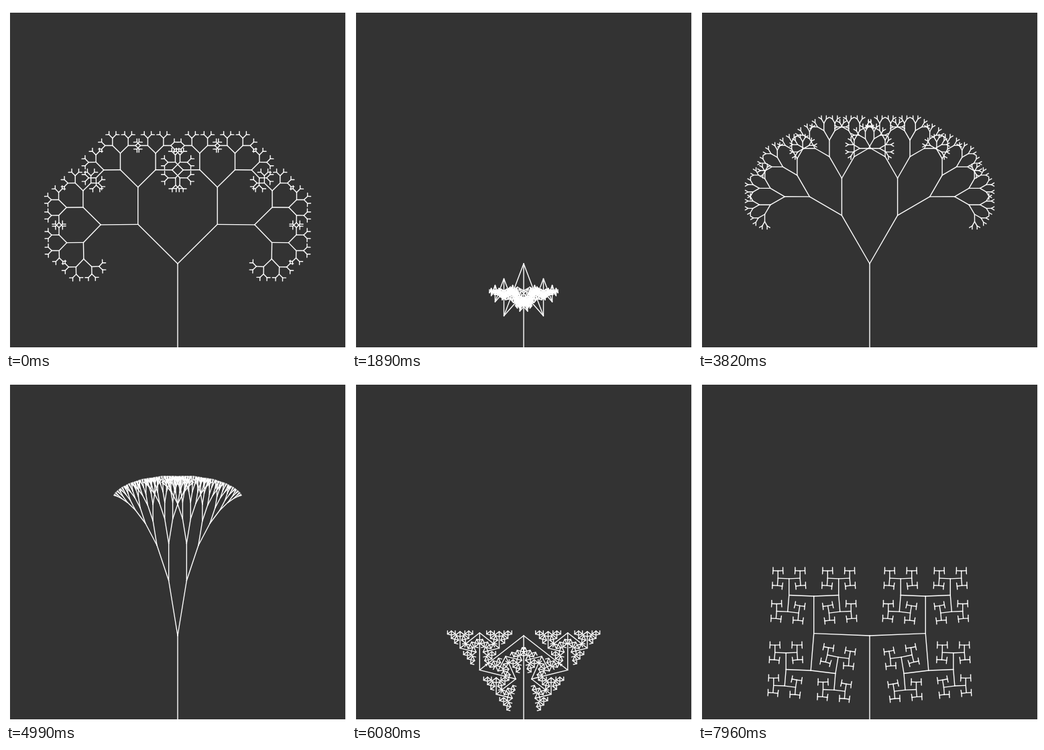
An HTML page with a canvas that plays this animation: 507 px wide and 514 px high, repeating every 8 s.

```html
<!DOCTYPE html>
<html lang="en">
<head>
<meta charset="utf-8">
<title>Fractal tree</title>
<style>
  html, body { margin: 0; width: 100%; height: 100%; overflow: hidden; background: #fff; }
  canvas { display: block; width: 507px; height: 514px; }
</style>
</head>
<body>
<canvas id="stage" width="507" height="514"></canvas>
<script>
const ctx = document.getElementById('stage').getContext('2d');
const LOOP = 8000;
const TICK = 76;
const RATIO = 2 / 3;
const REST = 0.79;

// Drags of the angle; ease above 1 slows towards the end
const drags = [
  { at: 1200, steps: 10, to: 2.78, ease: 2 },
  { at: 2200, steps: 5, to: 2.43 },
  { at: 2750, steps: 4, to: 1.72, ease: 0.85 },
  { at: 3130, steps: 3, to: 1.19 },
  { at: 3440, steps: 8, to: 0.3 },
  { at: 4140, steps: 2, to: 0.21 },
  { at: 4390, steps: 3, to: 0 },
  { at: 4990, steps: 11, to: 1.63, ease: 1.09 },
  { at: 5830, steps: 11, to: 2.99, ease: 1.3 },
  { at: 6780, steps: 1, to: 3 },
  { at: 7100, steps: 11, to: 1.67 },
  { at: 7960, steps: 1, to: 1.53 }
];

function angleAt(t) {
  let angle = REST;
  for (const { at, steps, to, ease = 1 } of drags) {
    if (t < at) break;
    const step = Math.min(Math.floor((t - at) / TICK) + 1, steps);
    angle += (to - angle) * (1 - (1 - step / steps) ** ease);
  }
  return angle;
}

function branch(x, y, len, heading, spread) {
  const tx = x + len * Math.sin(heading);
  const ty = y - len * Math.cos(heading);
  ctx.beginPath();
  ctx.moveTo(x, y);
  ctx.lineTo(tx, ty);
  ctx.stroke();
  const next = len * RATIO;
  if (next > 4) {
    branch(tx, ty, next, heading + spread, spread);
    branch(tx, ty, next, heading - spread, spread);
  }
}

function draw(angle) {
  ctx.fillStyle = '#fff';
  ctx.fillRect(0, 0, 507, 514);
  ctx.save();
  ctx.beginPath();
  ctx.rect(6, 10, 500, 500);
  ctx.clip();
  ctx.fillStyle = '#333';
  ctx.fillRect(6, 10, 500, 500);
  ctx.strokeStyle = '#fff';
  ctx.lineWidth = 1.4;
  ctx.lineCap = 'round';
  branch(256, 510, 125, 0, angle);
  ctx.restore();
}

const began = performance.now();
function frame() {
  draw(angleAt((performance.now() - began) % LOOP));
  requestAnimationFrame(frame);
}
frame();
</script>
</body>
</html>
```
